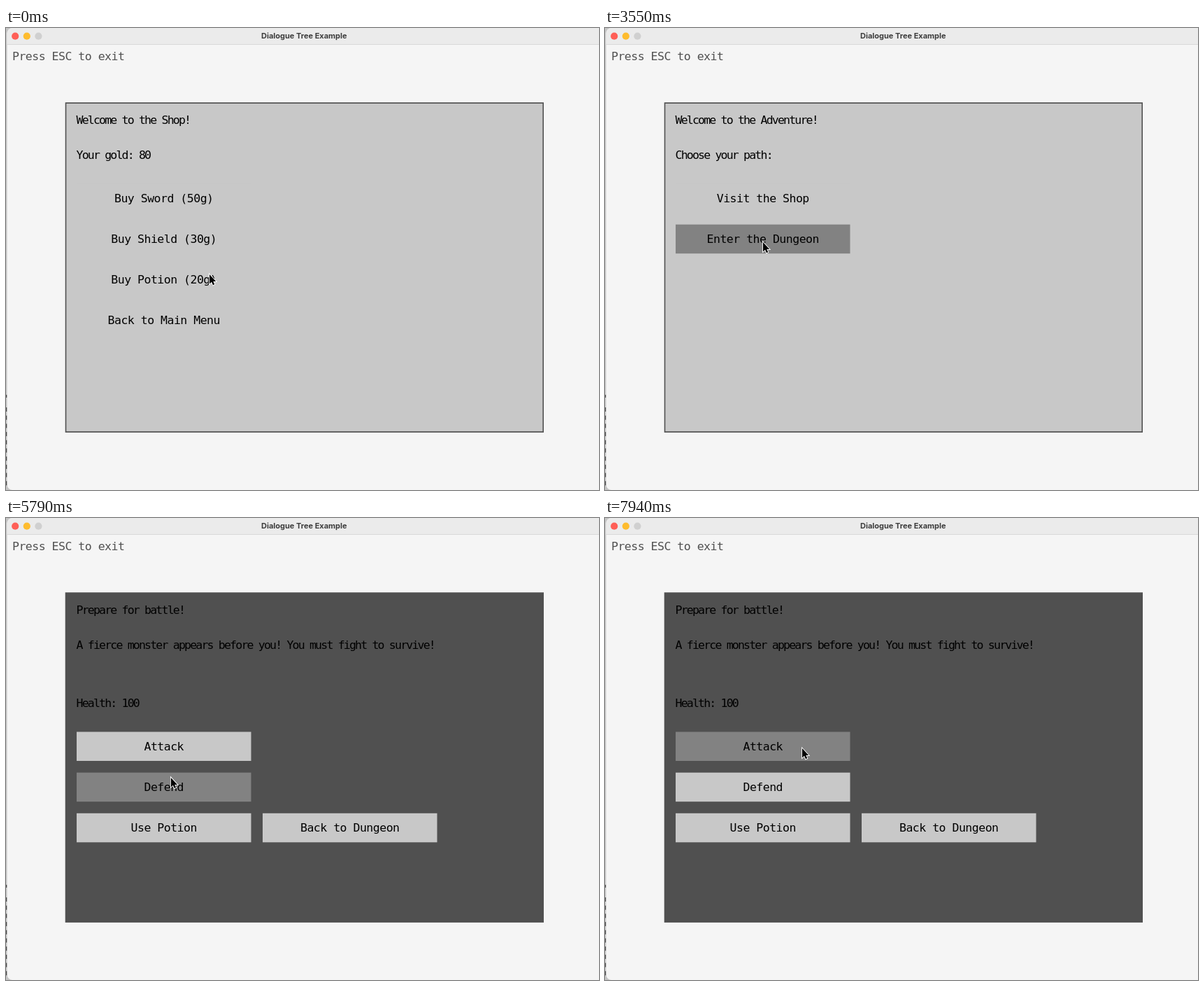
These frames come from a looping animation (848 by 660 pixels, 8 s). An HTML page with a canvas:

```html
<!DOCTYPE html>
<html lang="en">
<meta charset="utf-8">
<title>Dialogue Tree Example</title>
<style>
  html, body { margin: 0; width: 100%; height: 100%; overflow: hidden; background: #f5f5f5; }
  canvas { display: block; }
</style>
<canvas id="stage" width="848" height="660"></canvas>
<script>
const ctx = document.getElementById('stage').getContext('2d');
const LOOP = 8000;
const LIGHT = '#c8c8c8', HOVER = '#828282', DARK = '#505050';
const BUTTON = { w: 249.5, h: 41.5, left: 101, right: 367 };

// Lines are [text, centre y]; buttons are [label, top y, column, inert].
const scenes = [
  { from: 0, panel: LIGHT,
    lines: [['Welcome to the Shop!', 131], ['Your gold: 80', 181]],
    buttons: [['Buy Sword (50g)', 222.5, 'left', true], ['Buy Shield (30g)', 280.7, 'left', true],
              ['Buy Potion (20g)', 338.8, 'left', true], ['Back to Main Menu', 397, 'left']] },
  { from: 2470, panel: LIGHT,
    lines: [['Welcome to the Adventure!', 131], ['Choose your path:', 181]],
    buttons: [['Visit the Shop', 222.5, 'left'], ['Enter the Dungeon', 280.7, 'left']] },
  { from: 4180, panel: DARK,
    lines: [['You enter the dungeon...', 131],
            ['The dungeon is dark and damp. You hear strange noises echoing through', 181],
            ['the halls. What will you do?', 205.5], ['Health: 100 | Gold: 80', 255.5],
            ['Equipment: Potion', 297]],
    buttons: [['Fight Monsters', 338.8, 'left'], ['Search for Treasure', 397, 'left'],
              ['Return to Town', 397, 'right']] },
  { from: 5530, panel: DARK,
    lines: [['Prepare for battle!', 131],
            ['A fierce monster appears before you! You must fight to survive!', 181],
            ['Health: 100', 264]],
    buttons: [['Attack', 305.5, 'left'], ['Defend', 363.7, 'left'],
              ['Use Potion', 421.8, 'left'], ['Back to Dungeon', 421.8, 'right']] }
];

// Pointer moves: first step, last step, number of steps, destination.
const start = { x: 291, y: 352 };
const moves = [
  [510, 690, 3, 304, 341], [780, 960, 3, 288.5, 353.5], [1140, 1320, 3, 283, 356],
  [1760, 2200, 6, 243, 424], [2830, 3550, 9, 226, 306], [4720, 5260, 7, 234, 366],
  [5790, 6240, 6, 259, 432], [6330, 6510, 3, 279, 446], [6600, 6600, 1, 278.5, 446],
  [7130, 7850, 9, 282, 329]
];

function pointerAt(time) {
  let { x, y } = start;
  for (const [first, last, steps, toX, toY] of moves) {
    if (time < first) break;
    const interval = (last - first) / (steps - 1) || 1;
    const p = Math.min(Math.floor((time - first) / interval) + 1, steps) / steps;
    const eased = p * p * (3 - 2 * p);
    x += (toX - x) * eased;
    y += (toY - y) * eased;
  }
  return { x, y };
}

function rect(x, y, w, h, fill) {
  ctx.fillStyle = fill;
  ctx.fillRect(x, y, w, h);
}

function text(string, x, middle, { align = 'left', spacing = -0.5, fill = '#000' } = {}) {
  ctx.font = '16.5px "DejaVu Sans Mono", monospace';
  ctx.letterSpacing = spacing + 'px';
  ctx.textAlign = align;
  ctx.fillStyle = fill;
  ctx.fillText(string, x, middle + 6);
}

function drawWindow() {
  rect(0, 0, 848, 660, '#c4c4c4');
  for (let y = 542; y < 655; y += 11.7) rect(0, y, 1.5, 6, '#444');
  rect(0, 524, 1.5, 4, '#444');

  ctx.save();
  ctx.beginPath();
  ctx.roundRect(1.5, 0, 860, 660, 8);
  ctx.clip();
  rect(0, 0, 848, 660, '#f5f5f5');
  rect(0, 0, 848, 23, '#ebebeb');
  rect(0, 23, 848, 1, '#d9d9d9');
  ctx.restore();

  ['#ff5f57', '#febc2e', '#d0d0d0'].forEach((fill, i) => {
    ctx.fillStyle = fill;
    ctx.beginPath();
    ctx.arc(13.2 + i * 16.6, 11.7, 5.1, 0, 7);
    ctx.fill();
  });
  ctx.font = 'bold 11px Inter, sans-serif';
  ctx.letterSpacing = '0px';
  ctx.textAlign = 'center';
  ctx.fillStyle = '#3d3d3d';
  ctx.fillText('Dialogue Tree Example', 426.3, 15.3);
  text('Press ESC to exit', 9, 39.7, { fill: DARK });
}

function drawScene(scene, pointer) {
  rect(84.7, 106.3, 684.3, 471.6, DARK);
  rect(86.3, 108, 681.1, 468.2, scene.panel);
  for (const [string, y] of scene.lines) text(string, 100.5, y, { spacing: -1.8 });
  for (const [label, y, column, inert] of scene.buttons) {
    const x = BUTTON[column], { w, h } = BUTTON;
    const inside = pointer.x >= x && pointer.x < x + w && pointer.y >= y && pointer.y < y + h;
    rect(x, y, w, h, inside && !inert ? HOVER : LIGHT);
    text(label, x + w / 2, y + h / 2 - 0.5, { align: 'center' });
  }
}

const arrow = new Path2D('M0 0V13.5L3 10.8 5 15.2 7.2 14.2 5.3 10H9.2Z');

function drawPointer({ x, y }) {
  ctx.save();
  ctx.translate(x, y);
  ctx.strokeStyle = '#fff';
  ctx.lineWidth = 1.8;
  ctx.stroke(arrow);
  ctx.fillStyle = '#000';
  ctx.fill(arrow);
  ctx.restore();
}

function draw() {
  const time = performance.now() % LOOP;
  const pointer = pointerAt(time);
  drawWindow();
  drawScene(scenes.findLast(scene => time >= scene.from), pointer);
  drawPointer(pointer);
  requestAnimationFrame(draw);
}
draw();
</script>
</html>
```
